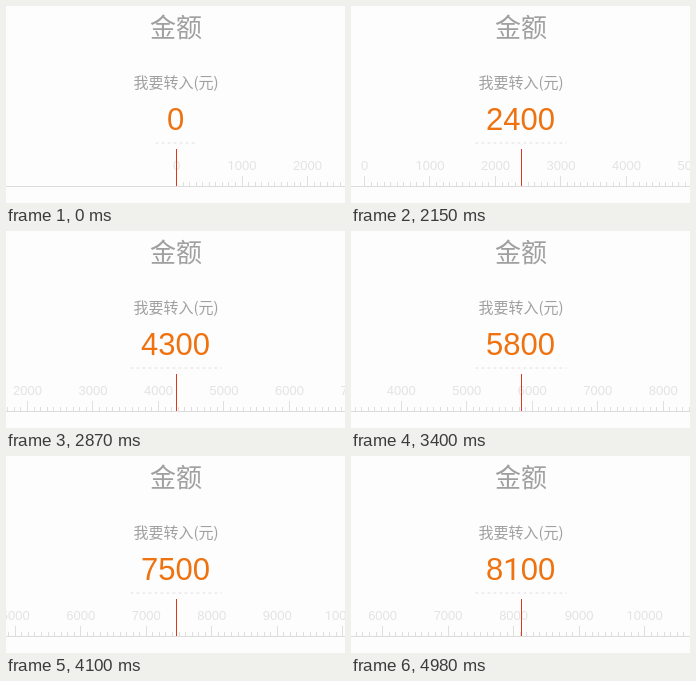
An HTML page that plays this animation: 339x197 px, repeating every 5.08 s.

```html
<!DOCTYPE html>
<html lang="zh-CN">
<head>
<meta charset="utf-8">
<style>
  html, body { margin: 0; width: 100%; height: 100%; overflow: hidden; background: #fdfdfd; }
  svg { display: block; width: 339px; height: 197px; }
  text { text-anchor: middle; }
  .cjk { font-family: "Noto Sans CJK SC", "Noto Sans CJK", sans-serif; fill: #a0a0a0; }
  .num { font-family: "Liberation Sans", Arial, sans-serif; }
  .one { font-family: Roboto, sans-serif; }
  #amount { font-size: 31px; fill: #ee7210; }
  #labels { font-size: 13px; fill: #e3e3e3; }
</style>
</head>
<body>
<svg viewBox="0 0 339 197">
  <text class="cjk" x="170" y="31" font-size="26">金额</text>
  <text class="cjk" x="170" y="82" font-size="15">我要转入(元)</text>
  <text class="num" id="amount" x="169.6" y="124"></text>
  <path id="underline" stroke="#e0e0e0" stroke-dasharray="3 3"/>
  <g class="num" id="labels"></g>
  <path id="ticks" stroke="#dfdfdf" fill="none"/>
  <path d="M0 180.5H339" stroke="#dcdcdc"/>
  <path d="M170.5 143V180" stroke="#d9391d"/>
</svg>
<script>
const LOOP = 5080, START = 1793, BEAT = 176.7;
const CENTER = 170.5, STEP = 6.55;
const $ = id => document.getElementById(id);

// Key points of the two flicks: [beat, ruler value]
const keys = [[0, 270], [2, 2397], [4, 3641], [6, 4275], [11, 6800], [15, 7907], [18, 8120]];

function slope(i) {
  const [b0, v0] = keys[Math.max(i - 1, 0)];
  const [b1, v1] = keys[Math.min(i + 1, keys.length - 1)];
  return (v1 - v0) / (b1 - b0);
}

// Smooth cubic curve through the key points
function rulerAt(beat) {
  if (beat < 0) return 0;
  const next = keys.findIndex(k => k[0] > beat);
  const i = (next < 0 ? keys.length - 1 : next) - 1;
  const [b0, v0] = keys[i], [b1, v1] = keys[i + 1];
  const h = b1 - b0, s = Math.min((beat - b0) / h, 1), r = 1 - s;
  return v0 + (v1 - v0) * s * s * (3 - 2 * s) + h * s * r * (slope(i) * r - slope(i + 1) * s);
}

// The figure 1 is drawn without a foot
const digits = n => String(n).replace(/1/g, '<tspan class="one">1</tspan>');

function draw(beat) {
  const value = rulerAt(beat);
  // The readout has a top speed, so it trails the first jerk
  const amount = Math.max(0, Math.min(Math.round(value / 100) * 100, 100 + 1400 * beat));
  $("amount").innerHTML = digits(amount);

  const half = (String(amount).length * 16.8 + 24) / 2;
  $("underline").setAttribute("d", `M${170 - half} 137H${170 + half}`);

  const at = value / 100;
  let ticks = "", labels = "";
  for (let i = Math.max(0, Math.floor(at) - 36); i < at + 36; i++) {
    const x = CENTER + (i - at) * STEP;
    const major = i % 10 === 0;
    ticks += `M${Math.floor(x) + 0.5} ${major ? 170 : 176}V180`;
    if (major) labels += `<text x="${x.toFixed(1)}" y="164">${digits(i * 100)}</text>`;
  }
  $("ticks").setAttribute("d", ticks);
  $("labels").innerHTML = labels;
}

let shown;
function tick() {
  const t = performance.now() % LOOP;
  const beat = Math.max(-1, Math.floor((t - START) / BEAT));
  if (beat !== shown) draw(shown = beat);
  requestAnimationFrame(tick);
}
tick();
</script>
</body>
</html>
```
